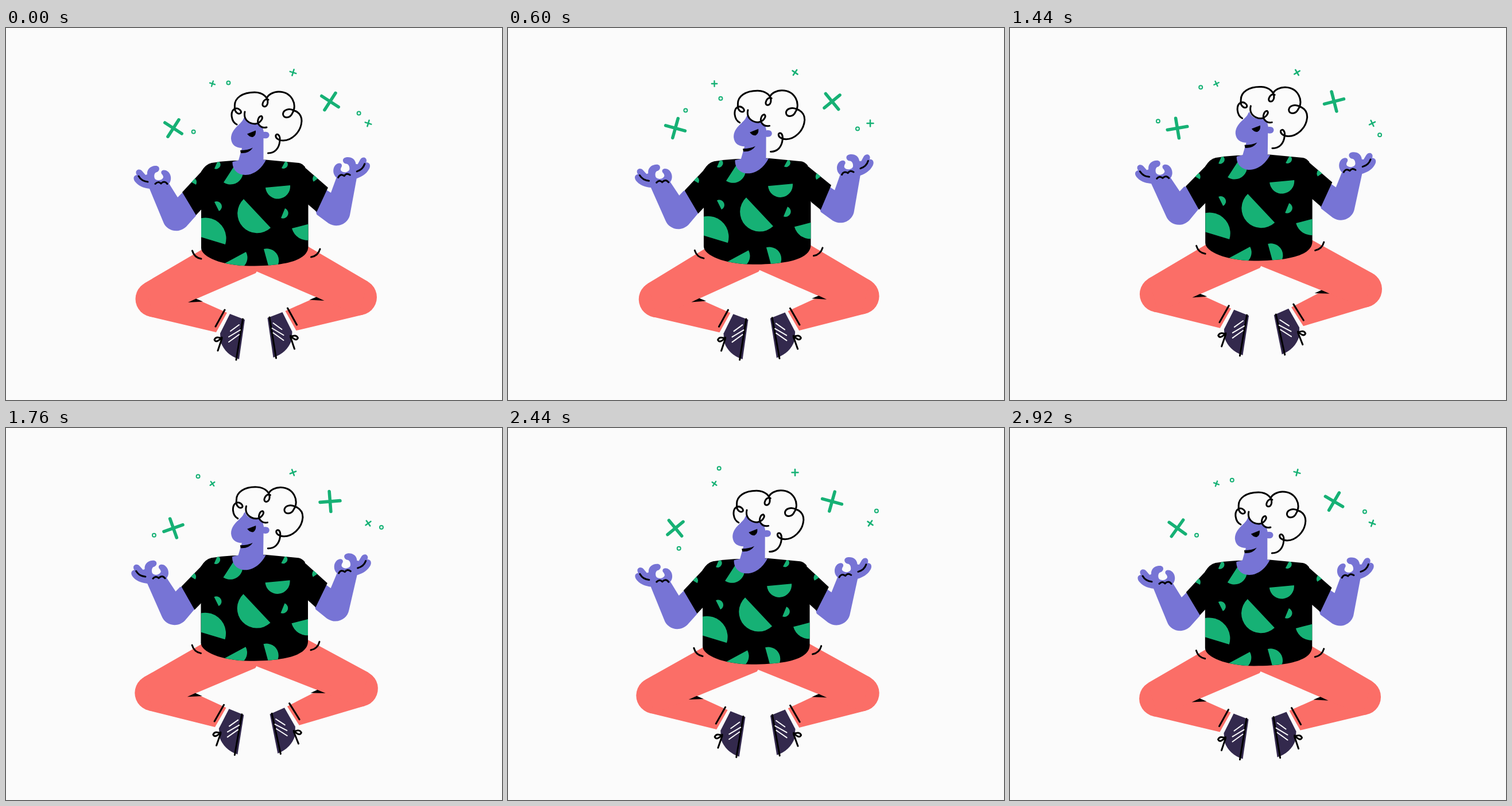
Write an HTML page that moves like this. It is 864 px wide and 648 px high and loops after 3 s.

```html
<!DOCTYPE html>
<html lang="en">
<head>
<meta charset="utf-8">
<title>Meditation</title>
<style>
  html, body { margin: 0; width: 100%; height: 100%; overflow: hidden; background: #fbfbfb; }
  svg { display: block; width: 100vw; height: 100vh; }
  .line { fill: none; stroke: #000; stroke-width: 3; stroke-linecap: round; stroke-linejoin: round; }
  .lace { fill: none; stroke: #fff; stroke-width: 2; stroke-linecap: round; }
  .skin { fill: #7774d5; }
  .coral { fill: #fb6e67; }
  .shoe { fill: #33294d; }
  .green { fill: #16b175; }
  #sparks { fill: none; stroke: #16b175; stroke-linecap: round; }
  .leg { transform-origin: 440px 400px; }
  .shin { transform-origin: 257px 472px; }
  .arm { transform-origin: 352px 246px; }
  .forearm { transform-origin: 296px 333px; }
  #head { transform-origin: 425px 240px; }
  #hair { transform-origin: 456px 218px; }
</style>
</head>
<body>
<svg viewBox="0 0 864 648">
  <defs>
    <path id="shirt" d="M358 235Q376 232 395 231L452 229.500L510 235Q516 236 521 242L526.500 303V381C526 399 503 414.500 425 414.500C376 414 340 399 340 383V250Q348 237 358 235Z"/>
    <clipPath id="shirtClip"><use href="#shirt"/></clipPath>
  </defs>
  <g id="sparks"></g>
  <g id="body">
    <g class="leg">
      <g class="shin">
        <path class="coral" d="M331 472L385 496L366 530L250 502.600L257 441Z"/>
        <path class="line" d="M381 491L365 520"/>
        <path class="shoe" d="M390 498L416 508L406 577Q382 569 374 547L373 532Z"/>
        <path class="line" d="M412.500 507L401 578M369 562L376 541Q366 536 363 543Q366 550 376 539"/>
        <path class="lace" d="M406 517L391 528M408 526L388 538M406 534L388 547"/>
      </g>
      <circle class="coral" cx="257" cy="472" r="31.500"/>
      <path class="coral" d="M455 395L360 375L241 444.700L257 503L318 478L331 472L435 427Z"/>
      <path d="M317 478L331 471.500L343 476.500Z"/>
      <path class="line" d="M324.500 388Q328 400 340 402"/>
    </g>
    <g id="legMirror" transform="translate(871.5 -3) scale(-1 1)"></g>
    <g class="arm">
      <g class="forearm">
        <path class="skin" d="M307 287L299 295L284 271C289 265 288 255 282 250C276 245 268 248 271 254C273 256 274 258 274 260C272 266 262 267 259 262C257 257 259 251 263 251C269 248 268 240 261 240C252 240 245 246 246 255L243 256L237 249C231 243 223 249 228 256C221 257 221 264 226 269C233 277 243 279 250 280L274 338C279 352 299 360 314 346L331 327L334 290Z"/>
        <path class="line" d="M231 258Q236 267 247 268M260 271.500Q265 266 270 271Q276 265 281 271.500"/>
      </g>
      <path d="M347 243L307 286L331 326L345 311L370 260Z"/>
      <path class="green" d="M329 262Q334 267 331 273L323 268.500Z"/>
    </g>
    <g id="armMirror" transform="translate(864 -3) scale(-1 1)"></g>
    <use href="#shirt"/>
    <!-- Half discs: each arc spans its chord -->
    <path class="green" clip-path="url(#shirtClip)" d="M363 245a1 1 0 0 0 6-14M379 269a1 1 0 0 0 24-37M480 244a1 1 0 0 0 7-13M452 278a1 1 0 0 0 43-4M414 298a1 1 0 0 0 47 50M371 319a1 1 0 0 0-8-16M479 331a1 1 0 0 0 7-17M382 377a1 1 0 0 0-69-21M498 349a1 1 0 0 0 54-14M381 410a1 1 0 0 0 37-20M460 425a1 1 0 0 0-11-40"/>
    <g id="head">
      <path class="skin" d="M414 157C411 168 392 174 392 193C393 204 401 209 411 209L405 230.500L394.500 233C394 247 404 256 417 256C434 256 447 242 453 229.500L448.500 230V192C462 195 462 178 449 181L447 173Q441 172 441 166Q421 170 416 155Z"/>
      <path d="M420 184.500L435 178.500Q436 187 430 190Q424 190 420 184.500ZM408 213Q421 213 430 208.500Q423 219 409 218Z"/>
      <path id="hair" class="line" d="M402 168C392 163 390 146 398 141C404 138 411 144 409 148C405 152 397 146 398.500 137C397 122 412 112 433 112C447 112 458 121 455.500 132C453 139 446 138 447 132C449 124 455 123 457 125M454 123C456 116 466 111 475 111C498 111 508 134 499 148C495 158 483 158 482.500 150C483 142 493 140 500 143C510 146 515 153 515 162C514 182 497 196 483 196C475 196 469 192 470 187C472 183 478 186 477 196C476 210 468 218 456.500 218M416 146C413 160 424 167 434 167C443 166 449 157 445 153.500C440 153 436 164 441 169Q446 175 454 173"/>
    </g>
  </g>
</svg>
<script>
const TAU = 2 * Math.PI;
const find = selector => document.querySelector(selector);
const turn = (node, degrees) => { node.style.transform = `rotate(${degrees}deg)`; };

function addSpark(tag, attrs) {
  const node = document.createElementNS('http://www.w3.org/2000/svg', tag);
  for (const key in attrs) node.setAttribute(key, attrs[key]);
  return find('#sparks').appendChild(node);
}

// A cross turning in place
function cross(x, y, half, spin) {
  const node = addSpark('path', {
    d: `M${-half} 0H${half}M0 ${-half}V${half}`, 'stroke-width': 1.2 + half / 4
  });
  const tilt = half > 10 ? 33 : 17;
  return p => node.setAttribute('transform', `translate(${x} ${y}) rotate(${tilt + spin * 90 * p})`);
}

// A ring circling a cross
function ring(x, y, orbit, start, spin) {
  const node = addSpark('circle', { r: 3, 'stroke-width': 2 });
  return p => {
    const angle = (start / 360 + spin * p) * TAU;
    node.setAttribute('cx', x + orbit * Math.cos(angle));
    node.setAttribute('cy', y + orbit * Math.sin(angle));
  };
}

// The right limb is a mirrored copy of the left
function limbs(name, joint) {
  const left = find('.' + name);
  const right = find(`#${name}Mirror`).appendChild(left.cloneNode(true));
  return [left, right].map(limb => (angle, bend) => {
    turn(limb, angle);
    turn(limb.querySelector('.' + joint), bend);
  });
}

const sparks = [
  cross(291.5, 174.5, 17.5, -1), ring(291.5, 174.5, 35.7, 10, -1),
  cross(359.5, 97, 4.7, -1), ring(359.5, 97, 28, -3, 1),
  cross(631, 166, 5.5, -1), ring(631, 166, 24, -133, -1),
  cross(564.5, 128, 17.5, 1), cross(500, 77.5, 5.5, 1)
];
const [leftArm, rightArm] = limbs('arm', 'forearm');
const [leftLeg, rightLeg] = limbs('leg', 'shin');

// Twelve steps a second; the first of each second is held longer
function phaseAt(ms) {
  const t = ms % 3000;
  const step = Math.max(0, Math.floor((t % 1000 - 35) / 80));
  return (Math.floor(t / 1000) * 12 + Math.min(step, 11)) / 36;
}

function draw(p) {
  const sway = Math.sin(TAU * p);
  const x = 1 - Math.abs(2 * p - 1);
  const lift = x * x * x * (x * (6 * x - 15) + 10);
  const lag = 0.8;

  find('#body').setAttribute('transform', `translate(${sway} ${-9 * lift})`);
  turn(find('#head'), 0.7 * lift);
  turn(find('#hair'), 1.6 * lift);
  leftArm(1.5 * lift, -3.3 * lift - sway);
  rightArm(6 + 2 * sway, 6 - 2 * lift - 0.7 * sway);
  leftLeg(-1.1 * sway, 0.7 * sway + 0.6 * lift);
  rightLeg(1.2 * (Math.cos(lag) - Math.cos(TAU * p - lag)), 1.6 * lift + 0.8 * sway);
  sparks.forEach(move => move(p));
}

const begin = performance.now();
function tick() {
  draw(phaseAt(performance.now() - begin));
  requestAnimationFrame(tick);
}
tick();
</script>
</body>
</html>
```
